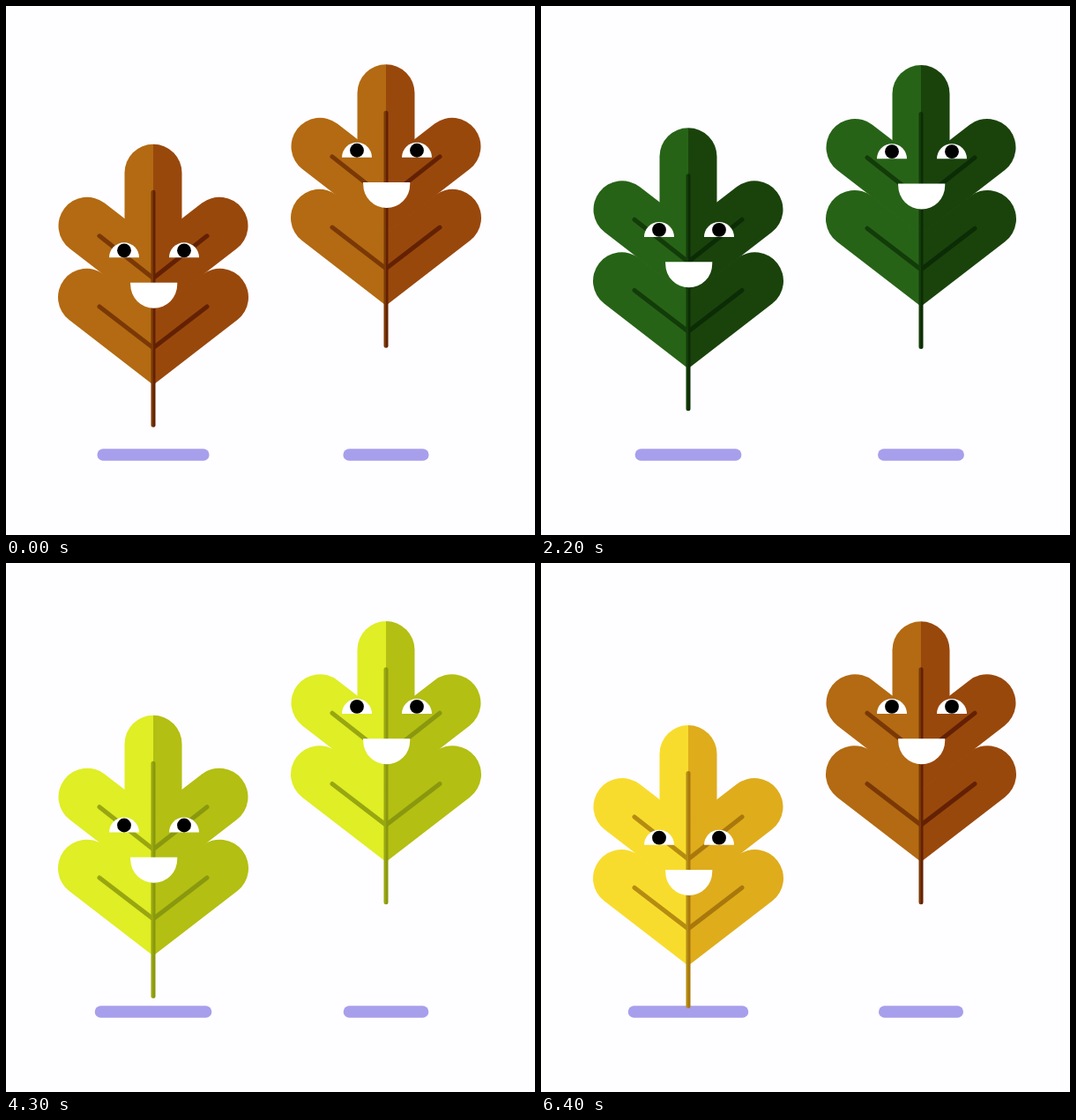
Write an HTML page with a canvas that moves like this. It is 600 px wide and 600 px high and loops after 6.5 s.

```html
<!DOCTYPE html>
<html lang="en">
<head>
<meta charset="utf-8">
<title>Bouncing leaves</title>
<style>
html, body { margin: 0; width: 100%; height: 100%; overflow: hidden; background: #fefdff; }
canvas { display: block; }
</style>
</head>
<body>
<canvas id="stage" width="600" height="600"></canvas>
<script>
const ctx = document.getElementById('stage').getContext('2d');

const LOOP = 6500, STEP = 100, TICKS = 195;
const PAIR = 65, SHORT_HOP = 32, LONG_HOP = 33, RISE = 17;
const APEX_Y = 66, DROP = 118, FACE_APEX_Y = 163, FACE_DROP = 149;

// Each colour set: light half, dark half, vein on light, vein on dark
const COLORS = {
  orange:    ['#b36a12', '#99480c', '#7a3806', '#632103'],
  brown:     ['#7a5316', '#57370e', '#4c2c07', '#3a2003'],
  darkGreen: ['#276317', '#1a430c', '#123c09', '#0c2c05'],
  green:     ['#6cab17', '#4e860f', '#44730b', '#3c660a'],
  lime:      ['#dfee25', '#b3bf12', '#98a611', '#8a980f'],
  yellow:    ['#f8dc2d', '#dfac1c', '#b58c12', '#a8780c']
};

const LEAVES = [
  { x: 167, lead: 3, cycle: ['orange', 'brown', 'darkGreen', 'green', 'lime', 'yellow'] },
  { x: 431, lead: 84, cycle: ['lime', 'yellow', 'orange', 'brown', 'darkGreen', 'green'] }
];

// Bezier easing with flat ends; x1 and x2 are the horizontal handles
function ease(x, x1, x2) {
  if (x <= 0) return 0;
  if (x >= 1) return 1;
  let low = 0, high = 1;
  for (let i = 0; i < 30; i++) {
    const s = (low + high) / 2, r = 1 - s;
    if (3 * s * r * r * x1 + 3 * s * s * r * x2 + s * s * s < x) low = s;
    else high = s;
  }
  return low * low * (3 - 2 * low);
}

// 0 at the top of the hop, 1 on the ground
function lowness(phase, length, fallStart, x1 = 0.94, x2 = 0.96) {
  return phase < fallStart
    ? 1 - ease(phase / RISE, 0.257, 0.162)
    : ease((phase - fallStart) / (length - fallStart), x1, x2);
}

function hopAt(tick) {
  const m = tick % TICKS || TICKS;
  const pair = Math.floor((m - 1) / PAIR);
  const q = m - pair * PAIR;
  return q > SHORT_HOP
    ? { index: pair * 2 + 1, phase: q - SHORT_HOP, length: LONG_HOP }
    : { index: pair * 2, phase: q, length: SHORT_HOP };
}

function line(x1, y1, x2, y2, width, color) {
  ctx.lineWidth = width;
  ctx.strokeStyle = color;
  ctx.beginPath();
  ctx.moveTo(x1, y1);
  ctx.lineTo(x2, y2);
  ctx.stroke();
}

// Half of a leaf, drawn towards positive x
function drawHalf(side, bodyY, crownY, fill, vein) {
  ctx.save();
  ctx.scale(side, 1);
  ctx.beginPath();
  ctx.rect(0, 0, 150, 600);
  ctx.clip();
  line(0, crownY + 32.5, 0, bodyY + 150, 65, fill);
  line(75, bodyY + 92.5, -40, bodyY + 181.3, 65, fill);
  line(75.5, bodyY + 173.5, -40, bodyY + 262.7, 65, fill);
  line(61, bodyY + 104, 0, bodyY + 152, 5, vein);
  line(61, bodyY + 184.2, 0, bodyY + 231, 5, vein);
  line(0, bodyY + 54.5, 0, bodyY + 318.5, 5, vein);
  ctx.restore();
}

function drawFace(y) {
  for (const x of [-33, 35]) {
    ctx.fillStyle = '#fff';
    ctx.beginPath();
    ctx.arc(x, y + 7.7, 17, Math.PI, 0);
    ctx.fill();
    ctx.fillStyle = '#000';
    ctx.beginPath();
    ctx.arc(x, y - 0.3, 7.9, 0, Math.PI * 2);
    ctx.fill();
  }
  ctx.fillStyle = '#fff';
  ctx.beginPath();
  ctx.moveTo(-26, y + 36);
  ctx.arc(0.7, y + 38.5, 26.5, Math.PI, 0, true);
  ctx.lineTo(27.3, y + 36);
  ctx.fill();
}

function drawLeaf({ x, lead, cycle }, tick) {
  const { index, phase, length } = hopAt(tick + lead);
  const body = lowness(phase, length, 17);
  const crown = lowness(phase, length, 18);
  const shadow = lowness(phase, length, 15, 0.83, 0.98);
  const [light, dark, veinLight, veinDark] = COLORS[cycle[index]];
  const bodyY = APEX_Y + DROP * body;
  const crownY = APEX_Y + DROP * crown;
  const reach = (96 + 40.5 * shadow) / 2 - 6.75;

  ctx.save();
  ctx.translate(x, 0);
  line(-reach, 508.9, reach, 508.9, 13.5, '#a79fec');
  drawHalf(-1, bodyY, crownY, light, veinLight);
  drawHalf(1, bodyY, crownY, dark, veinDark);
  drawFace(FACE_APEX_Y + FACE_DROP * body);
  ctx.restore();
}

function draw(time) {
  const tick = Math.floor((time % LOOP) / STEP) * 3;
  ctx.fillStyle = '#fefdff';
  ctx.fillRect(0, 0, 600, 600);
  ctx.lineCap = 'round';
  for (const leaf of LEAVES) drawLeaf(leaf, tick);
}

const start = performance.now();
function loop() {
  draw(performance.now() - start);
  requestAnimationFrame(loop);
}
loop();
</script>
</body>
</html>
```
